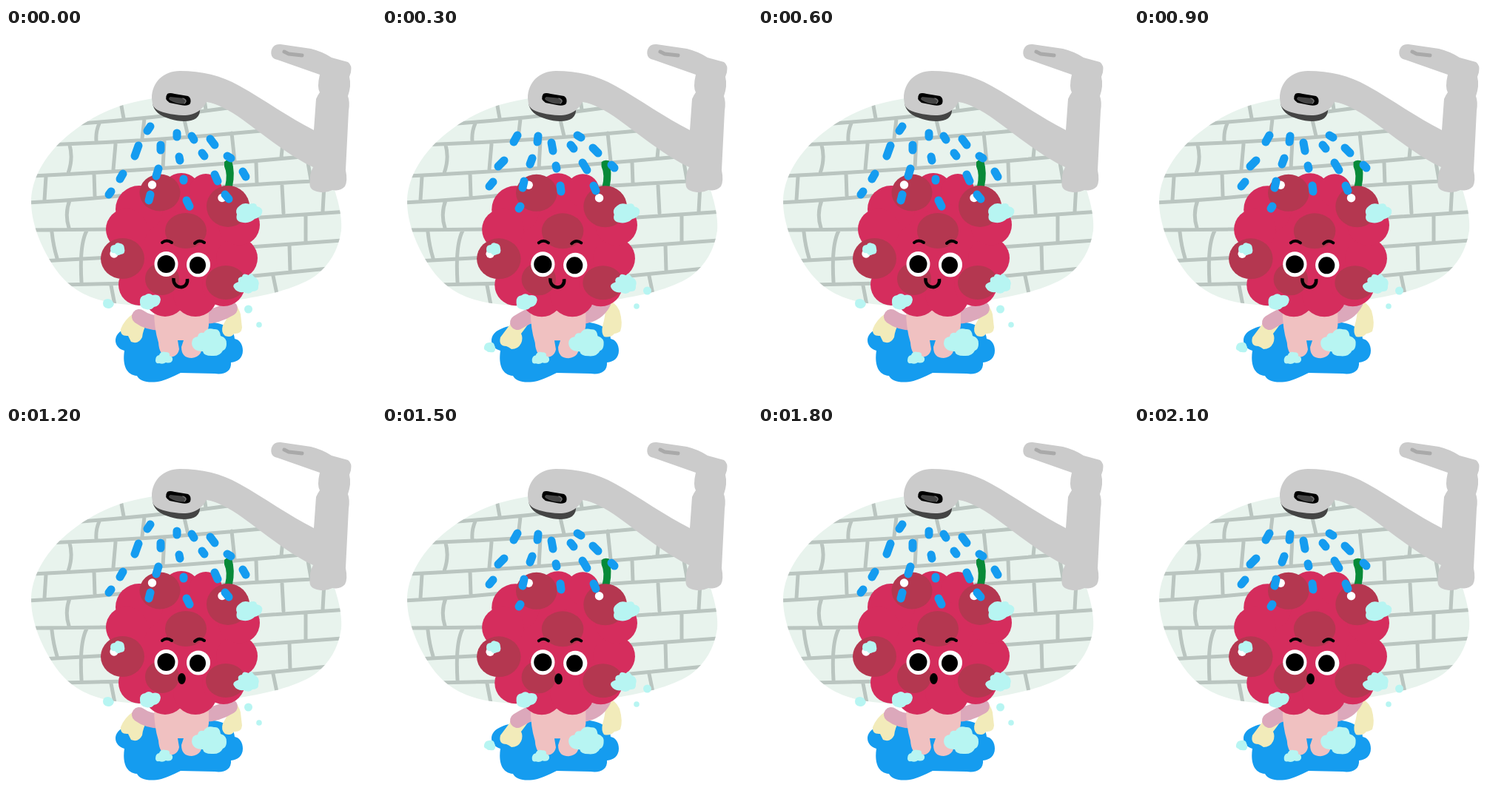
An HTML page that plays this animation: 500 px wide and 500 px high, repeating every 2.4 s.

```html
<!DOCTYPE html>
<html lang="en">
<head>
<meta charset="utf-8">
<title>Berry shower</title>
<style>
  html, body { margin: 0; width: 100%; height: 100%; overflow: hidden; background: #fff; }
  svg { display: block; width: 100%; height: 100%; }
  .line { fill: none; stroke-linecap: round; stroke-linejoin: round; }
  .foam { fill: #b7f5f2; }
  .dark { fill: #b43750; }
</style>
</head>
<body>
<svg viewBox="0 0 500 500">
  <defs>
    <clipPath id="wallShape">
      <path id="wall" d="M34 235C34 210 46 184 66 162C92 134 130 111 166 102C190 96 212 92 236 93C285 95 342 117 382 143C414 165 439 194 447 229C452 246 454 262 453 274C449 301 437 320 418 335C390 354 348 362 310 368C260 377 195 379 148 372C113 367 91 354 75 336C54 311 34 270 34 235Z"/>
    </clipPath>
  </defs>

  <use href="#wall" fill="#e8f3ed"/>
  <g clip-path="url(#wallShape)">
    <path class="line" stroke="#bac5c0" stroke-width="5" d="
      M90 130Q200 122 300 108M55 158Q200 153 345 139M36 200Q240 190 430 171
      M30 236Q110 232 180 224T415 207M30 273L140 272M330 257L460 248
      M48 315L140 310M330 296L455 287M75 347L165 345M325 336L445 324
      M155 100L159 122M267 90L270 110M126 129Q121 140 122 153M187 123L184 149M240 120L246 146
      M86 158Q91 177 84 196M148 157L145 191M214 152L212 189M305 142L309 180M375 145L372 175
      M54 201L52 232M119 197L120 227M338 182L339 210M407 176L412 205
      M86 233Q79 251 85 270M373 213L375 250M430 212L428 248
      M62 276Q64 295 69 311M109 274Q99 293 102 343M405 254L405 288
      M383 294L384 329M142 348L147 374M361 335L367 364"/>
  </g>

  <path fill="#444" d="M198 101C199 112 208 119 222 123C235 127 250 127 257 122Q263 117 262 108Z"/>
  <path fill="#cbcbcb" d="M197 95C197 73 213 58 235 58C265 58 290 64 315 78C351 98 382 121 416 138L419 96Q421 91 424 87Q420 80 424 63L367 43C359 42 357 35 359 29Q362 21 371 22L412 28Q428 32 440 40L462 46Q468 50 466 60L464 66Q467 78 462 92Q465 100 463 112L459 192Q462 207 458 214Q452 221 441 219Q431 224 420 221Q408 218 411 206Q410 198 415 188C385 174 350 146 320 124C302 111 285 102 271 100Q268 106 262 111C252 119 239 119 228 117C212 115 200 111 198 103Z"/>
  <path class="line" stroke="#a9a9a9" stroke-width="5" d="M376 32L382 35L400 37"/>
  <path d="M218 89Q221 87 228 89L246 92Q251 95 249 102Q246 106 236 104L221 101Q213 96 218 89Z"/>
  <path fill="#444" d="M222 93L241 95Q246 98 242 102Q234 104 224 99Q217 96 222 93Z"/>
  <path class="line" stroke="#777" stroke-width="1.2" d="M239 95Q246 98 241 102"/>

  <path fill="#159cef" d="M160 407C176 398 222 399 245 397C275 395 308 398 309 420C316 421 320 428 320 436C320 446 313 451 304 452C305 464 295 469 282 467L236 466Q220 474 210 477C193 481 180 477 177 470C163 469 157 456 160 436C145 432 143 414 160 407Z"/>

  <g id="armsA">
    <path fill="#f2ebba" d="M172 386L191 398Q185 408 184 418Q179 428 169 424L165 416Q154 417 155 407Q160 394 172 386ZM287 367C300 362 314 373 317 387L319 405Q318 414 308 413Q305 419 296 416Q290 411 293 402L302 386Z"/>
    <path class="line" stroke="#dca8bb" stroke-width="20" d="M180 390Q192 399 211 399M268 390Q285 390 303 379"/>
  </g>
  <g id="armsB">
    <path fill="#f2ebba" d="M175 398L204 391Q195 404 188 413Q191 419 188 426Q184 434 175 434Q171 431 168 430Q157 430 160 418ZM301 367Q315 369 321 382Q326 399 322 410Q317 413 314 413Q309 419 300 417Q296 412 298 403Q302 389 302 378Z"/>
    <path class="line" stroke="#dca8bb" stroke-width="20" d="M183 398Q196 390 207 386M270 390Q291 388 300 370"/>
  </g>

  <g id="berry">
    <path fill="#f0c1c1" d="M200 380H274V402Q272 418 264 427Q267 444 251 446Q237 446 237 431L240 422H232L234 434Q232 445 219 445Q207 443 206 425Q200 406 200 380Z"/>
    <g id="lobes" fill="#d52d5d"></g>
    <path fill="#078a38" d="M295 181Q298 177 305 179Q310 195 306 214H296Q300 198 295 187Z"/>
    <g id="spots" class="dark"></g>
    <g fill="#fff">
      <circle cx="197.500" cy="212" r="5.700"/><circle cx="292" cy="229.500" r="5.700"/><circle cx="146" cy="305" r="5.700"/>
      <ellipse cx="216.500" cy="319" rx="16" ry="17"/><ellipse cx="260" cy="320" rx="16" ry="16.500"/>
    </g>
    <ellipse cx="216.500" cy="319" rx="12" ry="12"/><ellipse cx="259" cy="320.500" rx="11" ry="11.500"/>
    <path class="line" stroke="#000" stroke-width="4" d="M211 290Q217 285 224 290M255 291Q261 285 268 290"/>
    <path id="smile" fill="none" stroke="#000" stroke-width="4.500" d="M226.500 338C225 354 247 354 245 339"/>
    <ellipse id="gasp" cx="237.500" cy="341.500" rx="5.300" ry="7.500"/>
    <g class="foam">
      <path d="M312 252Q309 245 316 240Q321 235 329 238Q338 235 339 241Q348 243 346 250Q344 256 336 258Q330 264 321 263Q309 262 312 252Z"/>
      <path d="M308 351Q305 346 314 343Q312 337 319 336Q320 330 328 334Q331 329 335 336Q344 340 341 349Q342 356 333 356Q329 361 321 357Q312 358 308 351Z"/>
      <path d="M181 371Q180 362 188 361Q193 357 198 361Q208 359 209 367Q208 376 200 377Q196 382 189 380Q181 379 181 371Z"/>
      <path d="M251 426Q251 418 259 417Q260 411 267 412Q272 404 281 407Q289 406 290 416Q299 419 298 427Q298 434 293 436Q289 444 278 443Q267 443 266 437Q252 437 251 426Z"/>
      <path d="M202 449Q202 443 207 442Q209 436 216 438Q222 438 221 443Q226 444 225 449Q223 454 216 452Q212 455 207 453Q202 454 202 449Z"/>
    </g>
  </g>
  <path class="foam" d="M141 299Q141 293 147 293Q149 289 154 291Q160 292 160 298Q162 305 155 306Q150 309 147 304Q141 305 141 299Z"/>

  <g id="splashA" class="foam">
    <path d="M131 372Q131 366 138 366Q144 367 146 373Q144 379 138 379Q131 378 131 372Z"/>
    <circle cx="327.500" cy="380" r="5.500"/><circle cx="342" cy="401" r="3.800"/>
  </g>
  <g id="splashB" class="foam">
    <path d="M138 431Q139 425 145 425Q151 424 152 429Q155 434 151 438Q143 439 141 436Q137 435 138 431Z"/>
    <circle cx="358.500" cy="355" r="5.500"/><circle cx="344" cy="376" r="3.800"/>
  </g>

  <g class="line" stroke="#159cf0" stroke-width="11">
    <path id="dropsA" d="M195 133L191 139M179 159L174 173M209 158L209 165M231 142L231 147M251 146L254 151M276 150L282 158M265 169L268 173M234 174L235 179M206 190L203 200M158 197L154 204M142 221L139 225M195 225L193 233M240 204L240 206M244 233L248 241M282 198L286 207M299 173L304 176M320 194L324 201M296 225L301 231"/>
    <path id="dropsB" d="M183 145L178 154M211 146L210 154M229 155L231 166M264 145L269 148M255 158L259 163M285 162L292 169M165 179L157 187M203 176L200 184M235 186L236 190M271 182L277 192M310 185L314 189M150 208L145 214M192 207L190 216M241 213L242 221M286 213L289 220M187 241L185 244"/>
  </g>
</svg>
<script>
const LOOP = 2400, STEP = 300;
const el = id => document.getElementById(id);
const show = (id, on) => el(id).setAttribute('visibility', on ? 'visible' : 'hidden');
const ellipses = list => list.map(([x, y, rx, ry = rx]) =>
  `<ellipse cx="${x}" cy="${y}" rx="${rx}" ry="${ry}"/>`).join('');

el('lobes').innerHTML = ellipses([
  [240, 295, 80], [237, 223, 27], [180, 245, 32], [163, 272, 28], [270, 219, 22], [300, 241, 28],
  [180, 347, 28], [215, 362, 28], [256, 360, 30], [294, 347, 29], [312, 311, 28], [315, 266, 28]
]);
el('spots').innerHTML = ellipses([
  [208, 222.5, 27.5, 25], [300, 241, 29, 28], [243, 274, 28, 24],
  [157.5, 311.5, 29.5, 27.5], [211, 339, 23, 22], [297, 344, 27, 23]
]);

function render(time) {
  const step = Math.floor((time % LOOP) / STEP);
  const swayed = step % 2 === 1;
  const gasping = step >= 4;
  for (const part of ['arms', 'splash', 'drops']) {
    show(part + 'A', !swayed);
    show(part + 'B', swayed);
  }
  show('smile', !gasping);
  show('gasp', gasping);
  el('berry').setAttribute('transform', swayed ? 'matrix(1.009 0 0 1 -1.1 .3)' : '');
}

const start = performance.now();
function tick() {
  render(performance.now() - start);
  requestAnimationFrame(tick);
}
tick();
</script>
</body>
</html>
```
